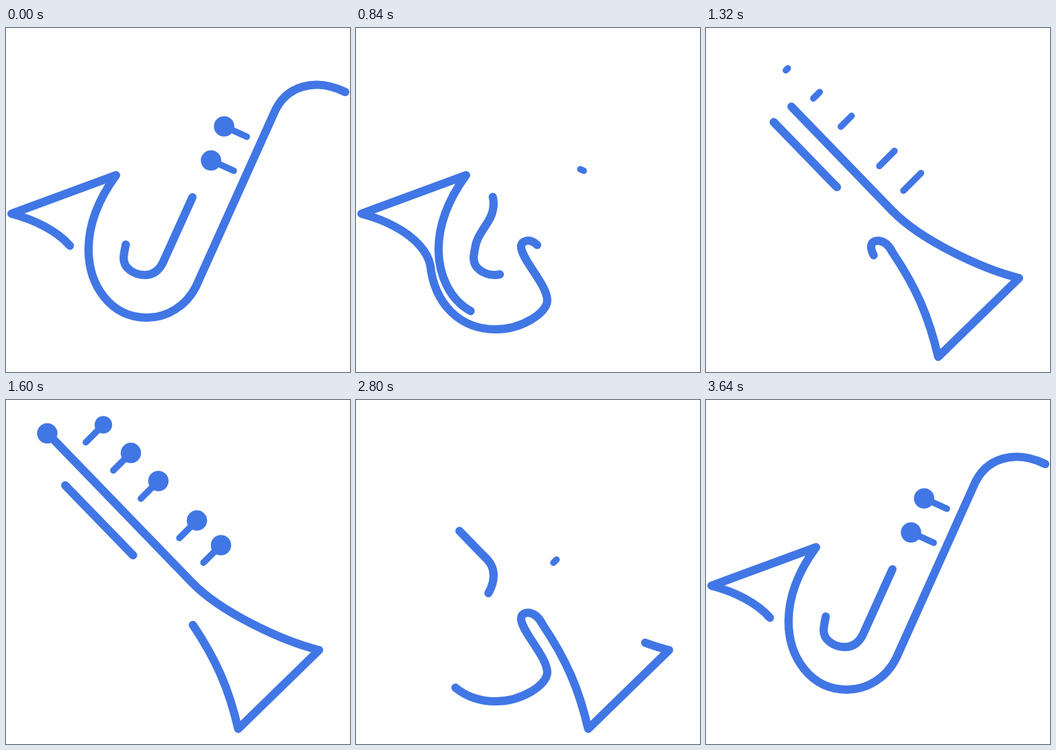
An HTML page for the animation above (3840 ms loop, 500 by 500 pixels).

```html
<!DOCTYPE html>
<html lang="en">
<head>
<meta charset="utf-8">
<title>Saxophone and trumpet</title>
<style>
  html, body { margin: 0; width: 100%; height: 100%; overflow: hidden; background: #fff; }
  svg { display: block; width: 100%; height: 100%; }
  path, line { fill: none; stroke: #4176e5; stroke-linecap: round; stroke-linejoin: round; }
  path { stroke-width: 12; }
  line { stroke-width: 9.4; }
  circle { fill: #4176e5; }
</style>
</head>
<body>
<svg id="stage" viewBox="0 0 500 500"></svg>
<script>
const LOOP = 3840, STEP = 40, BUTTON_TIME = 320, DOT_RADIUS = 14.8;
const stage = document.getElementById('stage');

const clamp = v => Math.max(0, Math.min(1, v));
const ramp = (time, start, duration = BUTTON_TIME) => clamp((time - start) / duration);
// Soft start, longer settling.
const ease = t => 1 - (1 - t ** 1.6) ** 3;

function add(tag, attrs) {
  const el = document.createElementNS('http://www.w3.org/2000/svg', tag);
  for (const name in attrs) el.setAttribute(name, attrs[name]);
  return stage.appendChild(el);
}

// One long path: the visible stroke slides from its sax part, over the bridge, to its trumpet part.
function slidingLine(sax, bridge, trumpet, tailStart) {
  const path = add('path');
  const measure = d => {
    path.setAttribute('d', d);
    return path.getTotalLength();
  };
  const saxEnd = measure(sax);
  const trumpetStart = measure(sax + bridge);
  const total = measure(sax + bridge + trumpet);
  return time => {
    const tail = trumpetStart * (ease(ramp(time, tailStart, 1020)) - ease(ramp(time, 2625, 900)));
    const headShift = ease(ramp(time, 560, 1070)) - ease(ramp(time, 2500, 987));
    const head = saxEnd + (total - saxEnd) * headShift;
    path.setAttribute('stroke-dasharray', `${head - tail} ${total}`);
    path.setAttribute('stroke-dashoffset', -tail);
  };
}

// The stem grows out of its foot, then the dot swells at its top.
function button(x, y, stemX, stemY, amount) {
  const footX = x + stemX, footY = y + stemY;
  const stem = add('line', { x1: footX, y1: footY });
  const dot = add('circle', { cx: x, cy: y });
  return time => {
    const v = amount(time), grown = clamp(v * 2);
    stem.setAttribute('x2', footX - stemX * grown);
    stem.setAttribute('y2', footY - stemY * grown);
    stem.setAttribute('visibility', v > 0 ? 'visible' : 'hidden');
    dot.setAttribute('r', DOT_RADIUS * clamp(v * 2 - 1));
  };
}

const body = slidingLine(
  `M493 93 C450 72 406 83 389 125 L276 376 C262 404 234 421 205 421
   C152 421 120 374 120 322 C120 280 138 244 160 214 L8 270 C43 279 74.6 295.6 92.5 316`,
  `C100.5 325 106 335 108 345 C114 400 150 438 203 438 C241 438 278 414 278 396
   C278 373 240 336 240 318 C240 306 260 304 271 326`,
  'C306 378 324 420 337.5 478 L455 363.5 C400 350 312 308 271 266 L60 48',
  536);

const tube = slidingLine(
  'M271 246 L228 341 C222 353 213 359 202 359 C186 359 171 349 171 335 C171 328 173 321 174 315',
  'C179 293 200 281 200 255 C200 244 196 236 185 226',
  'L86 124',
  500);

const saxButtons = [0, 1].map(i =>
  button(317 - 19 * i, 143 + 49.5 * i, 33, 15, time =>
    1 - ramp(time, 484 + 60 * i) + ramp(time, 3206 - 70 * i)));

const trumpetButtons = [0, 40, 80, 136, 171].map((along, i) =>
  button(141.5 + along, 36 + 1.023 * along, -25.5, 25.5, time =>
    ramp(time, 1302 - 40 * i) - ramp(time, 2228 + 70 * i)));

const mouthpiece = add('circle', { cx: 60, cy: 48.5 });

function draw(time) {
  [body, tube, ...saxButtons, ...trumpetButtons].forEach(update => update(time));
  mouthpiece.setAttribute('r', DOT_RADIUS * (ramp(time, 1360, 200) - ramp(time, 2220, 200)));
}

const start = performance.now();
function tick() {
  const time = (performance.now() - start) % LOOP;
  draw(Math.floor(time / STEP) * STEP);
  requestAnimationFrame(tick);
}
tick();
</script>
</body>
</html>
```
